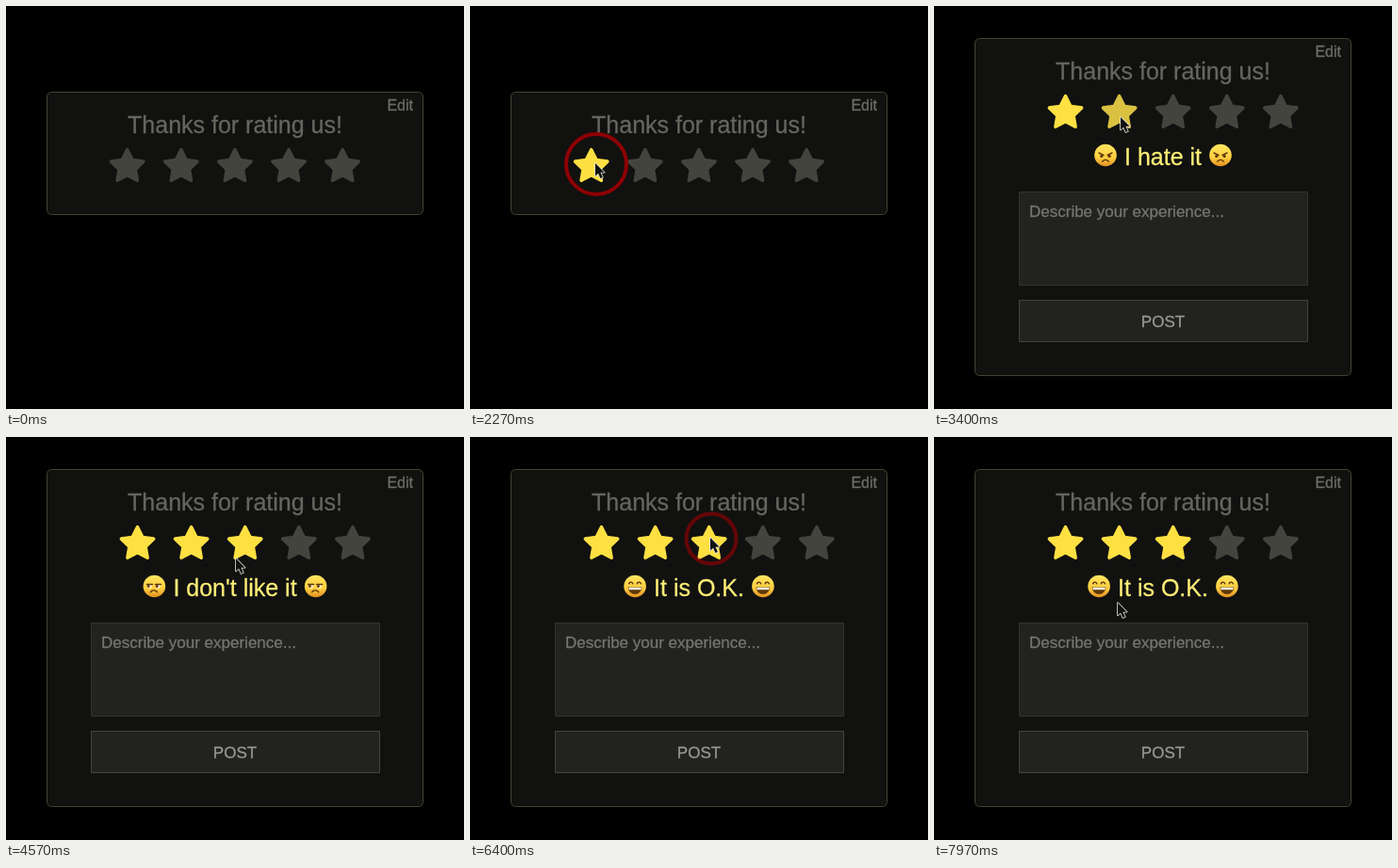
Recreate the animation shown at these times as an HTML page with a canvas. Size 486x428 px, loop 8 s.

```html
<!DOCTYPE html>
<html lang="en">
<head>
<meta charset="utf-8">
<title>Star rating</title>
<style>
html, body { margin: 0; width: 100%; height: 100%; overflow: hidden; background: #000; }
canvas { display: block; }
</style>
</head>
<body>
<canvas id="stage" width="486" height="428"></canvas>
<script>
const ctx = document.getElementById('stage').getContext('2d');
const LOOP = 8000;
const FADE = 200;
const PITCH = 57.1;
const FONT = '"Liberation Sans", Arial, sans-serif';
const OFF = [68, 68, 62], ON = [255, 224, 66];
const BROWN = '#5e3708';

// Pointer stops: time, x, y
const stops = [
  [40, 490, 122], [1400, 100, 186], [1760, 133, 167], [2850, 133, 167],
  [3050, 160, 212], [3340, 198, 118], [4050, 198, 118], [4570, 244, 129],
  [5530, 203, 163], [6150, 255, 107], [6700, 255, 107], [7900, 195, 176]
];

const clicks = [
  { down: 2170, up: 2360, label: 'I hate it' },
  { down: 3800, up: 3960, label: "I don't like it" },
  { down: 6190, up: 6320, label: 'It is O.K.' }
];

const clamp = v => Math.max(0, Math.min(1, v));
const smooth = u => u * u * (3 - 2 * u);
const mix = (a, b, u) => a + (b - a) * u;

function pointer(t) {
  const i = Math.max(1, stops.findIndex(s => t < s[0]));
  const next = t < stops.at(-1)[0] ? i : stops.length - 1;
  const [t0, x0, y0] = stops[next - 1], [t1, x1, y1] = stops[next];
  const u = smooth(clamp((t - t0) / (t1 - t0)));
  return [mix(x0, x1, u), mix(y0, y1, u)];
}

const rating = t => clicks.filter(c => t >= c.up).length;

const firstStar = open => open ? { x: 139.5, y: 113.7 } : { x: 128.7, y: 170.7 };

// Number of stars lit by selection or hover
function litCount(t) {
  const chosen = rating(t), first = firstStar(chosen > 0);
  const [x, y] = pointer(t);
  const k = Math.round((x - first.x) / PITCH) + 1;
  const over = Math.abs(y - first.y) < 29 && k >= 1 && k <= 5;
  return Math.max(chosen, over ? k : 0);
}

// Linear colour transition: share of the last FADE ms spent lit
function starLevels(t) {
  const n = 20, levels = [0, 0, 0, 0, 0];
  for (let i = 0; i < n; i++) {
    const count = litCount(t - FADE * (i + 0.5) / n);
    for (let k = 0; k < count; k++) levels[k] += 1 / n;
  }
  return levels;
}

function text(str, x, y, size, color, align = 'center') {
  ctx.font = `${size}px ${FONT}`;
  ctx.textAlign = align;
  ctx.fillStyle = ctx.strokeStyle = color;
  ctx.lineWidth = 0.3;
  ctx.fillText(str, x, y);
  ctx.strokeText(str, x, y);
}

function box(x, y, w, h, r, fill, border) {
  ctx.beginPath();
  ctx.roundRect(x + 0.5, y + 0.5, w - 1, h - 1, r);
  ctx.fillStyle = fill;
  ctx.fill();
  ctx.lineWidth = 1;
  ctx.strokeStyle = border;
  ctx.stroke();
}

function star(x, y, level) {
  ctx.beginPath();
  for (let i = 0; i < 10; i++) {
    const a = i * Math.PI / 5 - Math.PI / 2, r = i % 2 ? 9 : 18;
    ctx.lineTo(x + Math.cos(a) * r, y + Math.sin(a) * r);
  }
  ctx.closePath();
  ctx.lineJoin = 'round';
  ctx.lineWidth = 3.6;
  ctx.fillStyle = ctx.strokeStyle = `rgb(${OFF.map((c, i) => Math.round(mix(c, ON[i], level)))})`;
  ctx.fill();
  ctx.stroke();
}

function line(x0, y0, x1, y1) {
  ctx.beginPath();
  ctx.moveTo(x0, y0);
  ctx.lineTo(x1, y1);
  ctx.lineWidth = 1.4;
  ctx.strokeStyle = BROWN;
  ctx.stroke();
}

function dot(x, y, r, color) {
  ctx.beginPath();
  ctx.arc(x, y, r, 0, Math.PI * 2);
  ctx.fillStyle = color;
  ctx.fill();
}

function arc(x, y, r, from, to, width, color) {
  ctx.beginPath();
  ctx.arc(x, y, r, from * Math.PI, to * Math.PI);
  ctx.lineWidth = width;
  ctx.strokeStyle = color;
  ctx.stroke();
}

function angry() {
  for (const s of [-1, 1]) {
    line(s * 7, -2.5, s * 2, 0);
    dot(s * 4.2, 1, 1.6, BROWN);
  }
  arc(0, 9, 4, 1.2, 1.8, 1.5, BROWN);
}

function unamused() {
  for (const x of [-5, 4]) {
    dot(x, 0, 2.4, '#fff3d0');
    dot(x - 1.2, 0, 1.4, BROWN);
    line(x - 3, -2, x + 3, -2);
  }
  arc(-0.5, 9, 4.5, 1.22, 1.78, 1.5, BROWN);
}

function grin() {
  for (const x of [-4.3, 4.3]) arc(x, -2, 2.2, 1.1, 1.9, 1.5, BROWN);
  ctx.beginPath();
  ctx.arc(0, 1, 7.5, 0, Math.PI);
  ctx.fillStyle = BROWN;
  ctx.fill();
  ctx.fillStyle = '#fff8e8';
  ctx.fillRect(-6.6, 1.3, 13.2, 2.4);
}

function emoji(face, x, y) {
  ctx.save();
  ctx.translate(x, y);
  ctx.lineCap = 'round';
  const g = ctx.createLinearGradient(0, -12, 0, 12);
  g.addColorStop(0, '#ffe660');
  g.addColorStop(0.6, '#ffce40');
  g.addColorStop(1, '#e08c20');
  dot(0, 0, 11.8, g);
  face();
  ctx.restore();
}

function feedback(chosen) {
  const str = clicks[chosen - 1].label;
  const face = [angry, unamused, grin][chosen - 1];
  text(str, 243, 169, 25, '#ffee77');
  const gap = ctx.measureText(str).width / 2 + 20;
  emoji(face, 243 - gap, 158.5);
  emoji(face, 243 + gap, 158.5);
  box(90, 197, 307, 100, 0, '#222220', '#333328');
  text('Describe your experience...', 101, 223.5, 17, '#757570', 'left');
  box(90, 312, 307, 45, 0, '#222220', '#444434');
  text('POST', 243, 340.5, 17, '#999994');
}

function ring(t) {
  for (const c of clicks) {
    const out = clamp((t - c.up) / 250);
    if (t < c.down || out === 1) continue;
    const [x, y] = pointer(t);
    ctx.globalAlpha = clamp((t - c.down) / 60) * (1 - out);
    arc(x + 1, y + 1, 32 - 17 * out, 0, 2, 4, '#8e0004');
    ctx.globalAlpha = 1;
  }
}

function arrow(t) {
  const [x, y] = pointer(t);
  ctx.save();
  ctx.translate(x, y);
  ctx.lineJoin = 'round';
  ctx.lineWidth = 1.6;
  ctx.strokeStyle = '#e6e6dc';
  ctx.fillStyle = '#111';
  const shape = new Path2D('M0 0V13.5L3.1 10.7 5.4 16 7.8 15 5.5 9.8H9.6Z');
  ctx.stroke(shape);
  ctx.fill(shape);
  ctx.restore();
}

function draw(t) {
  const chosen = rating(t), open = chosen > 0;
  const top = open ? 34 : 91;
  ctx.fillStyle = '#000';
  ctx.fillRect(0, 0, 486, 428);
  box(43, top, 400, open ? 359 : 131, 5, '#111110', '#444434');
  text('Edit', 432, top + 20, 16, '#6c6c66', 'right');
  text('Thanks for rating us!', 243, top + 44, 25, '#666660');
  const first = firstStar(open);
  starLevels(t).forEach((v, i) => star(first.x + PITCH * i, first.y, v));
  if (open) feedback(chosen);
  ring(t);
  arrow(t);
}

function tick() {
  draw(performance.now() % LOOP);
  requestAnimationFrame(tick);
}
tick();
</script>
</body>
</html>
```
